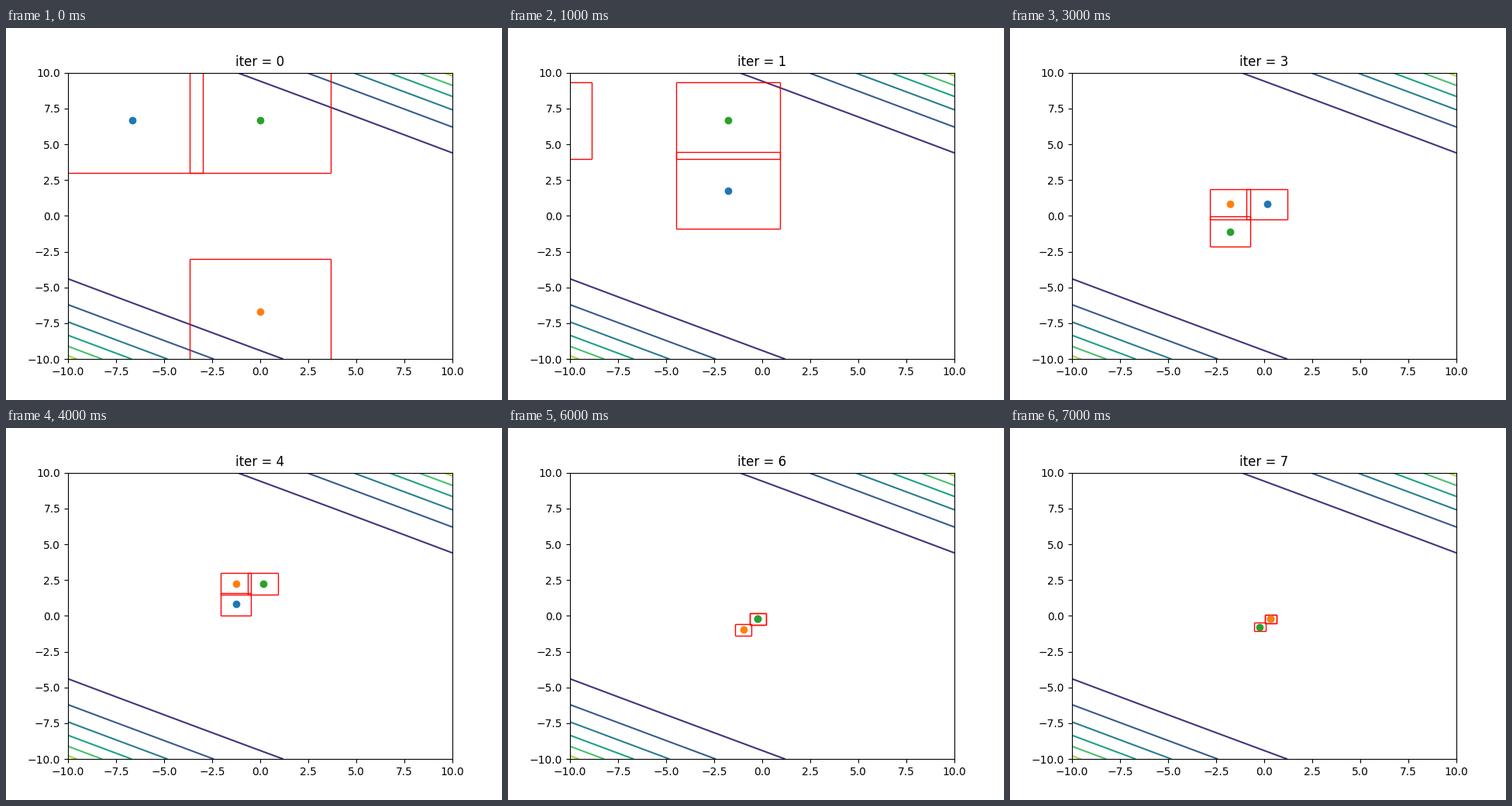
Recreate the animation shown at these times as a matplotlib script. Size 640 by 480 pixels, loop 8000 ms.

```python
import numpy as np
import matplotlib.pyplot as plt
from matplotlib.animation import FuncAnimation
from matplotlib.collections import LineCollection

LIMIT = 10
CELL = 2 * LIMIT / 3
OVERLAP = 1.1            # boxes are a little larger than their cells
SHRINK = 2 * OVERLAP / 3
COLORS = ("C0", "C1", "C2")

# Compass headings from the current centre to the cells tried in each round
# ("o" is the centre itself). A lone heading is a silent move, not shown.
ROUNDS = "NW S N, SE W E, S, N E SW, E o S, W NW N, SE SW SW, o SW o, E E S"


def zakharov(x, y):
    s = 0.5 * x + y
    return x**2 + y**2 + s**2 + s**4


def heading(name):
    return ("E" in name) - ("W" in name), ("N" in name) - ("S" in name)


def search():
    """Shrink the grid around the best point; yield (points, box size)."""
    center = np.zeros(2)
    size = CELL
    for cells in ROUNDS.split(","):
        points = center + size * np.array([heading(c) for c in cells.split()])
        if len(points) > 1:
            yield points, OVERLAP * size
        center = points[np.argmin(zakharov(*points.T))]
        size *= SHRINK


def box_sides(x, y, size):
    """Four separate sides, so the corners stay unjoined."""
    l, r, b, t = x - size / 2, x + size / 2, y - size / 2, y + size / 2
    return [[(l, b), (r, b)], [(l, t), (r, t)], [(l, b), (l, t)], [(r, b), (r, t)]]


STEPS = list(search())

fig, ax = plt.subplots(figsize=(6.4, 4.8), dpi=100)
axis = np.linspace(-LIMIT, LIMIT, 200)
gx, gy = np.meshgrid(axis, axis)
ax.contour(gx, gy, zakharov(gx, gy))
ax.set_xlim(-LIMIT, LIMIT)
ax.set_ylim(-LIMIT, LIMIT)
title = ax.set_title("")

boxes = [ax.add_collection(LineCollection([], colors="red", linewidths=1), autolim=False)
         for _ in COLORS]
dots = [ax.plot([], [], "o", color=c)[0] for c in COLORS]


def update(i):
    points, size = STEPS[i]
    for box, dot, (x, y) in zip(boxes, dots, points):
        box.set_segments(box_sides(x, y, size))
        dot.set_data([x], [y])
    title.set_text(f"iter = {i}")
    return [*boxes, *dots, title]


anim = FuncAnimation(fig, update, frames=len(STEPS), interval=1000, repeat=True)
plt.show()
```
